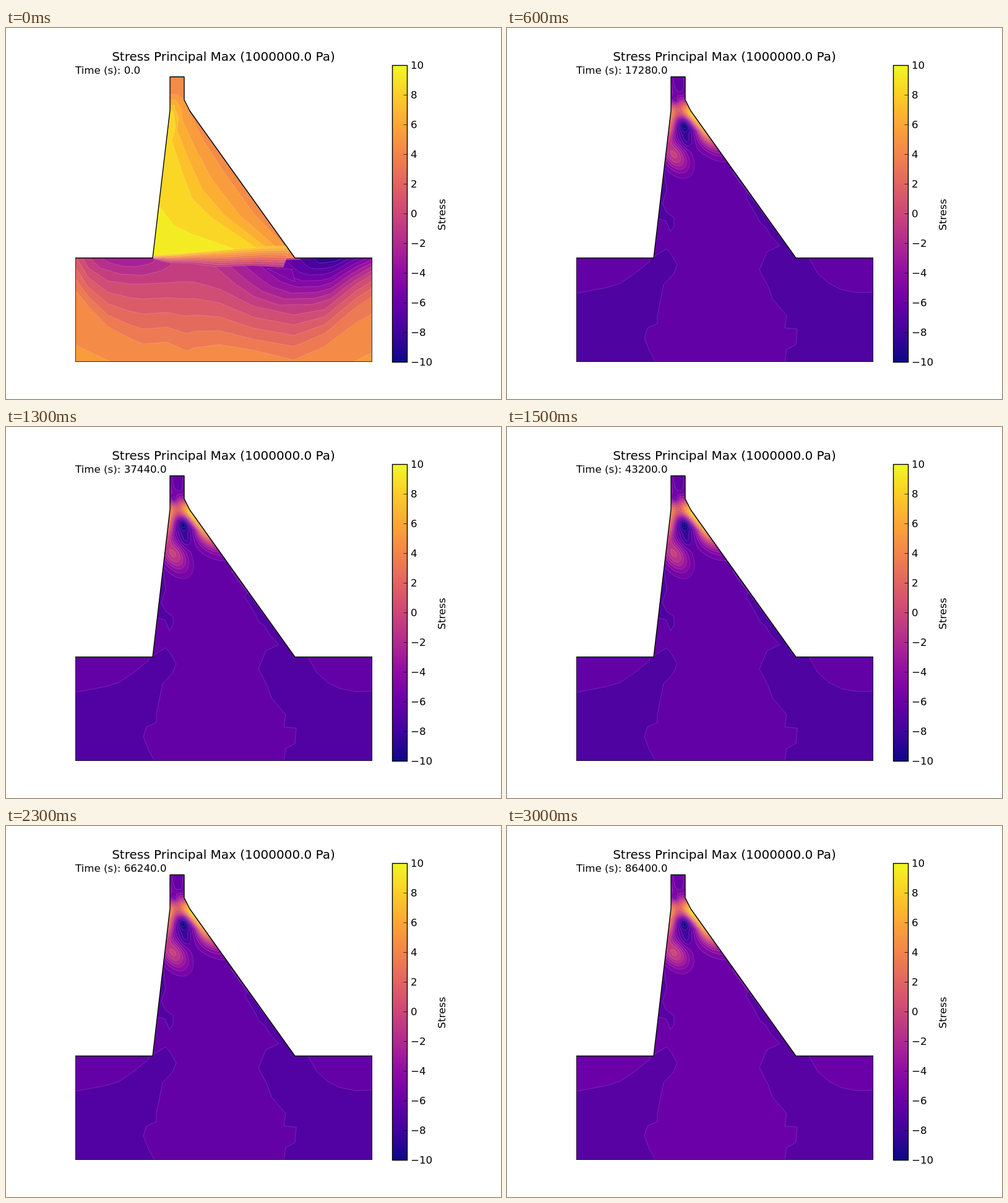
An HTML page with a canvas that plays this animation: 800 by 600 pixels, repeating every 3.1 s.

```html
<!DOCTYPE html>
<html lang="en">
<head>
<meta charset="utf-8">
<title>Stress Principal Max</title>
<style>
html, body { margin: 0; width: 100%; height: 100%; overflow: hidden; background: #fff; }
canvas { display: block; width: 800px; height: 600px; }
</style>
</head>
<body>
<canvas id="plot" width="800" height="600"></canvas>
<script>
const ctx = document.getElementById('plot').getContext('2d');
const FONT = 'px "DejaVu Sans", sans-serif';
const STEP = 100, STEPS = 31, BAND = 0.05;

const plasma = '0d0887 41049d 6a00a8 8f0da4 b12a90 cc4778 e16462 f2844b fca636 fcce25 f0f921'
  .split(' ').map(h => [0, 2, 4].map(i => parseInt(h.slice(i, i + 2), 16)));

const clamp = (v, lo = 0, hi = 1) => Math.max(lo, Math.min(hi, v));
const lerp = (a, b, t) => a + (b - a) * t;
const bell = (d, width) => Math.exp(-((d / width) ** 2));

function rgb(v) {
  const p = clamp(v) * (plasma.length - 1);
  const i = Math.min(plasma.length - 2, Math.floor(p));
  return plasma[i].map((c, k) => Math.round(lerp(c, plasma[i + 1][k], p - i)));
}

const pts = s => s.split(' ').map(p => p.split(',').map(Number));
const mix = (a, b, t) => a.map((p, i) => p.map((c, k) => lerp(c, b[i][k], t)));

function trace(list) {
  ctx.beginPath();
  list.forEach(p => ctx.lineTo(...p));
  ctx.closePath();
}

function patch(list, v) {
  trace(list);
  ctx.fillStyle = `rgb(${rgb(v)})`;
  ctx.fill();
  ctx.strokeStyle = 'rgba(255,255,255,.3)';
  ctx.lineWidth = 0.5;
  ctx.stroke();
}

// Evenly spaced contours from outline a to outline b.
function nest(a, b, n, v, dv) {
  for (let i = 0; i < n; i++) patch(mix(a, b, n > 1 ? i / (n - 1) : 0), v + dv * i);
}

const dam = pts('237,372 265,133 265,79 288,79 288,116 297,134 467,372');
const body = [[112, 540], [112, 372], ...dam, [592, 372], [592, 540]];

// Initial state
const deep = pts('112,424 133,450 165,483 200,502 222,511 260,508 292,522 305,517 345,512 400,521 465,537 515,515 565,477 592,462');
const high = pts('112,350 133,388 165,409 200,414 222,414 260,412 292,410 305,411 345,422 400,450 465,464 515,455 565,415 592,399');
const poolRim = pts('337,385 372,415 400,434 440,448 495,447 525,438 545,422 565,408 592,392 640,372');
const poolCore = pts('497,371 501,376 505,380 511,380 520,379 526,378 532,377 537,375 541,373 545,371');
const leftRim = pts('135,371 152,388 185,398 220,400 250,393 268,383 262,371');
const leftCore = pts('153,371 168,380 188,385 208,386 230,382 240,377 240,371');
const warmRim = pts('255,109 275,107 288,116 294,132 318,180 350,230 400,300 450,352 230,375');
const warmCore = pts('255,133 270,134 274,160 268,183 282,225 300,275 330,305 405,356 230,375');
const hot = pts('240,285 249,290 272,320 300,333 340,347 368,357 230,370');
const seamTop = pts('236,368 270,366 320,362 370,358 430,353 460,352');
const seamLow = pts('238,373 260,379 300,381 340,386 400,384 448,387');

function drawStart() {
  patch(body, .72);
  patch(pts('112,513 148,530 170,540 112,540'), .77);
  patch(pts('592,525 575,533 563,540 592,540'), .77);
  for (let i = 0; i < 5; i++) {
    // Contours crowd together towards the right side.
    const line = deep.map(([x, y], k) =>
      [x, lerp(y, high[k][1], (i / 4) ** (1 - clamp((x - 400) / 480)))]);
    patch([...line, [592, 372], [112, 372]], .67 - i * BAND);
  }
  nest(leftRim, leftCore, 2, .42, -BAND);
  nest(poolRim, poolCore, 8, .42, -BAND);
  patch(pts('422,389 467,411 462,390'), .25);
  ctx.save();
  trace(dam);
  ctx.clip();
  patch(dam, .72);
  nest(warmRim, warmCore, 4, .77, BAND);
  patch(hot, .97);
  ctx.restore();
  for (let i = 0; i < 9; i++) {
    const edge = t => mix(seamTop, seamLow, t / 9);
    patch([...edge(i), ...edge(i + 1).reverse()], .87 - i * BAND);
  }
}

// Loaded state
const sides = [
  '112,429 160,420 183,413 208,396 230,378 232,372 237,372 240,368 258,357 266,367 275,383 269,398 253,415 243,465 243,478 227,485 222,501 230,522 240,540 112,540',
  '449,540 452,520 467,512 469,487 449,485 452,465 429,438 422,418 408,391 420,362 441,352 426,336 418,322 409,315 403,303 386,274 390,268 364,232 467,372 488,372 502,397 520,413 540,423 565,428 592,427 592,540',
  '250,230 254,230 258,262 251,284 258,298 270,307 270,321 264,329 257,312 238,307'
].map(pts);

const zone = { x: 240, y: 79, w: 115, h: 175, zoom: 2 };
const layer = document.createElement('canvas');
layer.width = zone.w * zone.zoom;
layer.height = zone.h * zone.zoom;
const layerCtx = layer.getContext('2d');

// Stress around the neck, relative to the level of the dam's centre.
function stress(x, y, low) {
  const fromLeft = x - 265 + Math.max(0, y - 133) * .117;
  const fromRight = 297 + (y - 134) * .714 - x;
  const spread = 12 + Math.max(0, y - 165) * .4;
  const crown = .35 * bell(y - 134, 15);
  const left = .42 * bell(fromLeft, 9) * bell(y - 158, 24);
  const right = .65 * bell(fromRight, spread) * bell(y - 160, 34);
  const lobe = .3 * bell(x - 270 - (y - 205) * .4, 20) * bell(y - 205, (low - 205) / 1.42);
  const pit = .2 * bell(x - 287, 9) * bell(y - 157, 11);
  const pocket = .09 * bell(x - 289, 10) * bell(y - 180, 14);
  const eye = .12 * bell(x - 272, 4) * bell(y - 117, 5);
  const cap = .05 * ((x - 277) / 9) ** 2 * clamp((115 - y) / 10);
  return crown + left + right + lobe + cap - pit - pocket - eye;
}

function drawNeck(level, low) {
  const { width, height } = layer;
  const image = layerCtx.createImageData(width, height);
  const bands = new Int8Array(width * height);
  for (let i = 0; i < bands.length; i++) {
    const x = zone.x + (i % width + .5) / zone.zoom;
    const y = zone.y + (Math.floor(i / width) + .5) / zone.zoom;
    const b = bands[i] = Math.floor((stress(x, y, low) + .01) / BAND);
    const rim = i >= width && (b !== bands[i - 1] || b !== bands[i - width]);
    if (!b && !rim) continue;
    const c = rgb(level + b * BAND).map(k => rim ? lerp(k, 255, .22) : k);
    image.data.set([...c, 255], i * 4);
  }
  layerCtx.putImageData(image, 0, 0);
  ctx.drawImage(layer, zone.x, zone.y, zone.w, zone.h);
}

function drawLoaded(n) {
  const level = .19 + .012 * Math.cos(n * Math.PI / 5);
  const low = 239 + 6 * Math.sin(Math.PI * (n + 2) / 32);
  patch(body, level);
  drawNeck(level, low);
  sides.forEach(s => patch(s, level - .045));
}

function text(s, x, y, size, align = 'left') {
  ctx.font = size + FONT;
  ctx.textAlign = align;
  ctx.fillStyle = '#000';
  ctx.fillText(s, x, y);
}

const bar = ctx.createLinearGradient(0, 540, 0, 60);
plasma.forEach((c, i) => bar.addColorStop(i / (plasma.length - 1), `rgb(${c})`));

function drawScale() {
  ctx.fillStyle = bar;
  ctx.fillRect(624, 60, 24, 480);
  ctx.strokeStyle = '#000';
  ctx.lineWidth = 1.39;
  ctx.strokeRect(624.5, 60.5, 24, 480);
  ctx.lineWidth = 0.7;
  for (let v = -10; v <= 10; v += 2) {
    const y = 300 - v * 24;
    ctx.beginPath();
    ctx.moveTo(642.5, y + .5);
    ctx.lineTo(648, y + .5);
    ctx.stroke();
    text(String(v).replace('-', '\u2212'), 654, y + 5.5, 16.67);
  }
  ctx.save();
  ctx.translate(710, 302);
  ctx.rotate(-Math.PI / 2);
  text('Stress', 0, 0, 16.67, 'center');
  ctx.restore();
}

function draw(n) {
  ctx.fillStyle = '#fff';
  ctx.fillRect(0, 0, 800, 600);
  ctx.save();
  ctx.beginPath();
  ctx.rect(112, 60, 480, 480);
  ctx.clip();
  ctx.save();
  trace(body);
  ctx.clip();
  if (n) drawLoaded(n);
  else drawStart();
  ctx.restore();
  trace(body);
  ctx.strokeStyle = '#000';
  ctx.lineWidth = 1.39;
  ctx.lineJoin = 'round';
  ctx.stroke();
  ctx.restore();
  drawScale();
  text('Stress Principal Max (1000000.0 Pa)', 351.5, 53, 20, 'center');
  text('Time (s): ' + (n * 2880).toFixed(1), 112, 74, 16.67);
}

const begin = performance.now();
let shown = -1;
function tick() {
  const n = Math.floor((performance.now() - begin) / STEP) % STEPS;
  if (n !== shown) draw(shown = n);
  requestAnimationFrame(tick);
}
tick();
</script>
</body>
</html>
```
